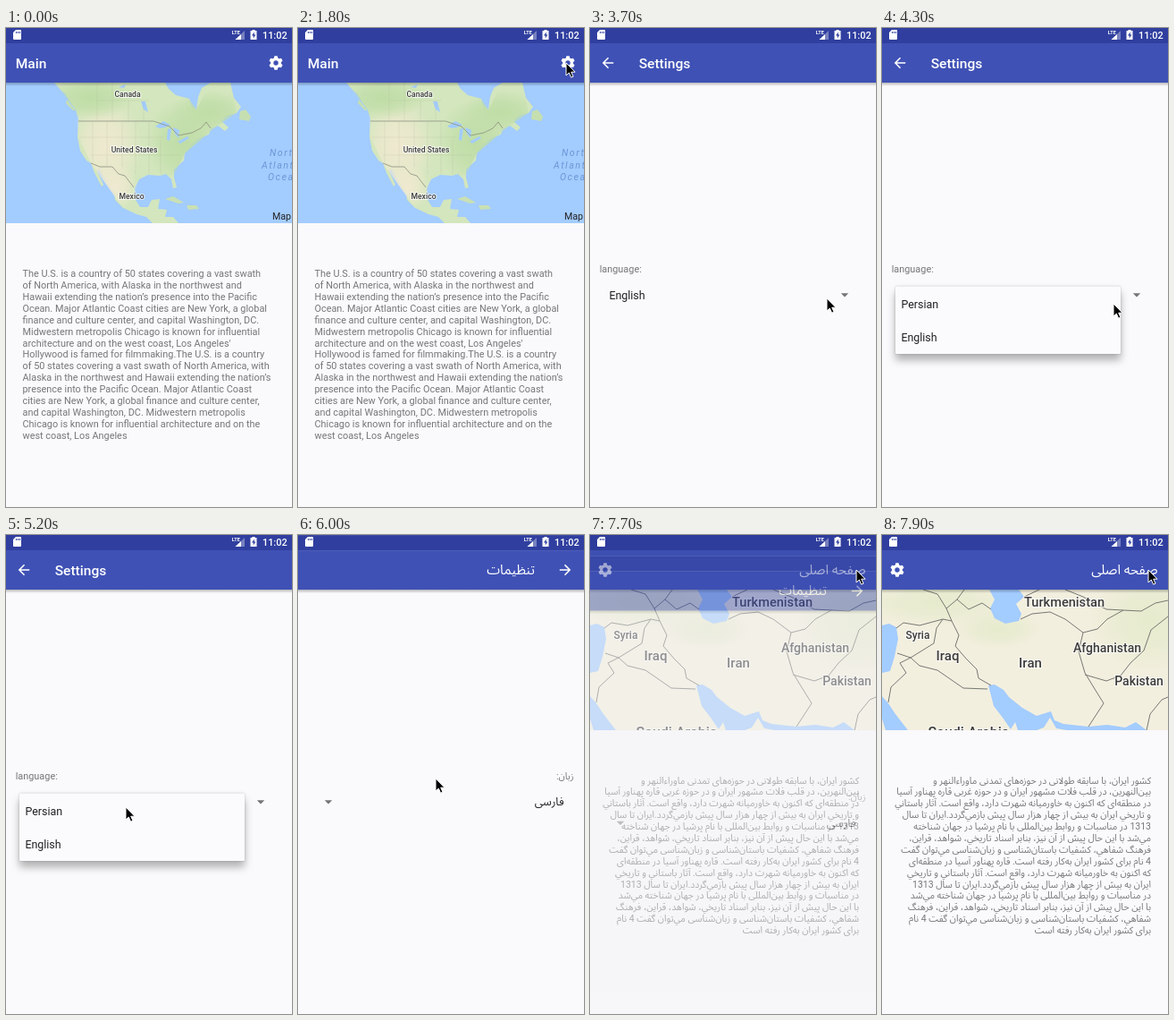
Animation, 320 px wide and 535 px high, one loop 8 s. Source, as an HTML page:

```html
<!DOCTYPE html>
<html lang="en">
<head>
<meta charset="utf-8">
<title>Language settings</title>
<style>
html, body { margin: 0; width: 100%; height: 100%; overflow: hidden; background: #000; }
svg { display: block; width: 320px; height: 535px; font-family: Roboto, "Noto Sans Arabic", "DejaVu Sans", sans-serif; }
text { white-space: pre; }
.title { font-size: 15.56px; font-weight: 500; fill: #fff; }
.fa .title { font-weight: 400; font-size: 15px; }
.small { font-size: 10.89px; fill: #767678; }
.fa .small { font-size: 10.5px; }
.item { font-size: 12.44px; fill: #212122; }
.clock { font-size: 10.89px; font-weight: 500; fill: #fff; }
.lte { font-size: 5.6px; font-weight: 700; fill: #fff; }
.place { font-weight: 500; fill: #3c3c3c; stroke: #fff; stroke-opacity: .7; stroke-width: 2px; paint-order: stroke; text-anchor: middle; }
.ocean { font-size: 10.5px; font-style: italic; letter-spacing: 1.6px; fill: #6a97d6; }
#popup { filter: drop-shadow(0 7px 5px rgba(0,0,0,.25)) drop-shadow(0 0 1px rgba(0,0,0,.22)); }
</style>
</head>
<body>
<svg id="stage" viewBox="0 0 320 535" xmlns="http://www.w3.org/2000/svg"></svg>
<script>
const stage = document.getElementById('stage');
const LOOP = 8000, STEP = 100;

const text = (cls, x, y, s, extra = '') => `<text class="${cls}" x="${x}" y="${y}" ${extra}>${s}</text>`;
const rtl = (cls, x, y, s) => text(cls, x, y, s, 'direction="rtl"');
const rect = (x, y, w, h, fill, extra = '') => `<rect x="${x}" y="${y}" width="${w}" height="${h}" fill="${fill}" ${extra}/>`;
const shape = (points, fill, extra = '') => `<path d="M${points}z" fill="${fill}" ${extra}/>`;
const place = (x, y, size, s) => text('place', x, y, s, `font-size="${size}"`);
const glow = (id, color) => `<radialGradient id="${id}"><stop offset="0" stop-color="${color}"/>` +
  `<stop offset=".5" stop-color="${color}" stop-opacity=".7"/><stop offset="1" stop-color="${color}" stop-opacity="0"/></radialGradient>`;
const blob = (x, y, rx, ry, id) => `<ellipse cx="${x}" cy="${y}" rx="${rx}" ry="${ry}" fill="url(#${id})"/>`;

function gear(cx, cy) {
  const pts = [];
  const add = (r, deg) => {
    const a = deg * Math.PI / 180;
    pts.push((cx + r * Math.cos(a)).toFixed(2) + ' ' + (cy + r * Math.sin(a)).toFixed(2));
  };
  for (let a = 30; a < 390; a += 60) {
    add(5.9, a - 22); add(7.9, a - 12); add(7.9, a + 12); add(5.9, a + 22);
  }
  return `<path fill="#fff" fill-rule="evenodd" d="M${pts.join('L')}z` +
    `M${cx - 2.7} ${cy}a2.7 2.7 0 1 0 5.4 0a2.7 2.7 0 1 0 -5.4 0z"/>`;
}

const arrow = (x, flip) => `<path transform="translate(${x} 39) scale(${flip * .78} .78)" fill="#fff" ` +
  `d="M8-1H-4.2L1.4-6.6L0-8L-8 0L0 8L1.4 6.6L-4.2 1H8z"/>`;
const caret = x => shape(`${x - 4.2} 296.2h8.4l-4.2 4.3`, '#747476');

const frame = (body, bar) => rect(0, 0, 320, 535, '#faf9fb') + body +
  rect(0, 61, 320, 4, 'url(#shade)') + rect(0, 0, 320, 17, '#303f9f') + rect(0, 17, 320, 44, '#3f51b5') + bar;

const paragraph = (lines, draw) => lines.trim().split('\n').map((s, i) => draw(s.trim(), i)).join('');

const america = () => {
  const land = '54 61L61 69L67 74L72 83L78 91L81 101L80 122L83 137L90 148L95 151L99 162L107 177L109 175L102 160L104 157' +
    'L112 171L121 184L122 192L131 201L146 208L157 211L164 218H193L187 211L178 211L180 203L170 202L172 191L163 192L159 200' +
    'L150 200L145 192L144 179L149 169L159 164L172 165L179 163L185 169L187 179L191 178L188 167L188 158L199 148L200 140' +
    'L206 131L216 123L227 119L229 113L237 109L245 115L249 111L241 104L247 98L258 95L263 88L255 78L251 61H229L219 67' +
    'L215 77L213 91L208 88L205 79L190 75L182 68L178 61';
  return `<g clip-path="url(#mapbox)">${rect(0, 61, 320, 157, '#a3ccff')}
    ${shape(land, '#d3e6bd')}
    <g clip-path="url(#usland)">
      ${blob(112, 132, 42, 58, 'sand')}${blob(122, 178, 26, 26, 'sand')}
      ${blob(198, 128, 42, 48, 'leaf')}${blob(95, 78, 48, 24, 'leaf')}${blob(228, 94, 44, 24, 'leaf')}
    </g>
    ${shape('262 93L268 91L274 99L272 104L261 102', '#c6dfb0')}
    ${shape('68 80L78 92L75 92L67 84', '#c6dfb0')}
    ${shape('178 191L187 188L199 195L193 196', '#c9e0b4')}
    ${shape('202 198L213 198L216 202L204 203', '#c9e0b4')}
    ${shape('167 110L176 104L184 108L178 111L172 112', '#a3ccff')}
    ${shape('181 113L185 112L183 126L180 125', '#a3ccff')}
    ${shape('187 111L194 114L193 123L189 118', '#a3ccff')}
    ${shape('192 127L203 121L205 123L195 129', '#a3ccff')}
    ${shape('151 82L156 82L159 94L154 91', '#a3ccff')}
    ${shape('126 66L134 63L132 67', '#a3ccff')}
    <path d="M81 104H165L183 110L193 120L208 117L218 112L224 105L229 112M95 151L105 155L119 155L126 163L133 165L143 178" fill="none" stroke="#8b9080" stroke-width=".8"/>
    <path d="M102 61V104M119 61V104M137 81V104M154 81V104M102 81H160M97 104V151M113 104V155M130 104V155M145 104V163M82 122H177M95 142H195M160 104V163M173 125V163" fill="none" stroke="#a8ab98" stroke-opacity=".32" stroke-width=".6"/>
    ${place(136, 77, 8.6, 'Canada')}${place(143.5, 139, 8.6, 'United States')}${place(140.5, 191, 8.6, 'Mexico')}
    ${text('ocean', 295, 143, 'North')}${text('ocean', 286, 156.5, 'Atlantic')}${text('ocean', 293, 170, 'Ocean')}
    ${text('', 298, 214, 'Map data', 'font-size="10.6" fill="#222"')}</g>`;
};

const iran = () => `<g clip-path="url(#mapbox)">${rect(0, 61, 320, 157, '#f3efdf')}
  ${blob(60, 75, 90, 28, 'pale')}${blob(300, 95, 70, 60, 'pale')}${blob(130, 105, 50, 22, 'pale')}
  ${shape('0 101L8 99L16 103L18 116L14 136L9 152L0 154', '#a3ccff')}
  ${shape('0 180L7 188L15 200L29 218H4L0 205', '#a3ccff')}
  ${shape('120 61L126 72L121 82L126 93L138 99L153 96L156 88L150 77L159 69L153 61', '#a3ccff')}
  ${shape('119 168L126 167L136 173L142 181L157 193L173 202L189 197L193 207L203 211L231 214L252 212L272 215L284 209L296 218H207L195 216L188 204L181 215L168 220L152 218L149 209L144 217L135 204L125 191', '#a3ccff')}
  <g fill="none" stroke="#777873" stroke-width="1" stroke-linejoin="round">
    <path d="M16 104L24 98L42 101L68 94L78 96L86 112L82 124L94 138L106 150L108 160L122 168"/>
    <path d="M68 94L61 104L58 121L32 137L17 132M32 137L42 146L62 151L91 171L118 172M32 137L20 143L27 154L10 170L7 187"/>
    <path d="M78 96L72 82L84 72L97 83L112 76L122 83M72 82L62 66L46 61M84 72L92 61"/>
    <path d="M155 94L168 88L188 86L205 94L225 109L220 130L227 154L238 172L248 188L231 214"/>
    <path d="M225 109L241 105L252 94L270 84L290 85L306 76L320 73M227 156L251 163L267 157L278 143L293 129L301 106L320 91"/>
    <path d="M159 69L176 61M205 61L225 69L251 83L270 84M296 218L300 200L313 184L320 181"/>
  </g>
  ${place(204, 80, 14.6, 'Turkmenistan')}${place(40, 116, 12, 'Syria')}${place(73.5, 139.5, 15, 'Iraq')}
  ${place(166, 148, 15, 'Iran')}${place(252, 131, 14, 'Afghanistan')}${place(287.5, 168, 14, 'Pakistan')}
  ${place(97, 226, 16, 'Saudi Arabia')}</g>`;

const english = paragraph(`The U.S. is a country of 50 states covering a vast swath
  of North America, with Alaska in the northwest and
  Hawaii extending the nation’s presence into the Pacific
  Ocean. Major Atlantic Coast cities are New York, a global
  finance and culture center, and capital Washington, DC.
  Midwestern metropolis Chicago is known for influential
  architecture and on the west coast, Los Angeles'
  Hollywood is famed for filmmaking.The U.S. is a country
  of 50 states covering a vast swath of North America, with
  Alaska in the northwest and Hawaii extending the nation’s
  presence into the Pacific Ocean. Major Atlantic Coast
  cities are New York, a global finance and culture center,
  and capital Washington, DC. Midwestern metropolis
  Chicago is known for influential architecture and on the
  west coast, Los Angeles`, (s, i) => text('small', 18.5, 278.2 + i * 12.89, s));

// an underscore stands for a zero-width non-joiner
const persian = paragraph(`کشور ایران، با سابقه طولانی در حوزه_های تمدنی ماوراءالنهر و
  بین_النهرین، در قلب فلات مشهور ایران و در حوزه غربی قاره پهناور آسیا
  در منطقه_ای که اکنون به خاورمیانه شهرت دارد، واقع است. آثار باستاني
  و تاریخي ایران به بیش از چهار هزار سال پیش بازمي_گردد.ایران تا سال
  1313 در مناسبات و روابط بین_المللی با نام پرشیا در جهان شناخته
  مي_شد با این حال پیش از آن نیز، بنابر اسناد تاریخي، شواهد، قراین،
  فرهنگ شفاهي، کشفیات باستان_شناسی و زبان_شناسی مي_توان گفت
  4 نام برای کشور ایران به_کار رفته است. قاره پهناور آسیا در منطقه_ای
  که اکنون به خاورمیانه شهرت دارد، واقع است. آثار باستاني و تاریخي
  ایران به بیش از چهار هزار سال پیش بازمي_گردد.ایران تا سال 1313
  در مناسبات و روابط بین_المللی با نام پرشیا در جهان شناخته مي_شد
  با این حال پیش از آن نیز، بنابر اسناد تاریخي، شواهد، قراین، فرهنگ
  شفاهي، کشفیات باستان_شناسی و زبان_شناسی مي_توان گفت 4 نام
  برای کشور ایران به_کار رفته است`, (s, i) => rtl('small', 301, 277.5 + i * 12.89, s.replace(/_/g, '&zwnj;')));

const screens = {
  mainEn: frame(america() + english, text('title', 10.7, 45.3, 'Main') + gear(302, 39)),
  mainFa: frame(iran() + persian, rtl('title', 308.5, 43.5, 'صفحه اصلی') + gear(17, 39)),
  setEn: frame(text('small', 10.7, 272.8, 'language:') + text('item', 21.4, 303, 'English') + caret(285),
    arrow(20, 1) + text('title', 54.7, 45.3, 'Settings')),
  setFa: frame(rtl('small', 308.5, 272.5, 'زبان:') + rtl('item', 297.5, 302, 'فارسی') + caret(34),
    arrow(299, -1) + rtl('title', 265, 43.5, 'تنظیمات'))
};

const status = `<path fill="#fff" fill-rule="evenodd" d="M11 2H16Q17 2 17 3V12Q17 13 16 13H9Q8 13 8 12V5zM11 4v2h1v-2zM13 4v2h1v-2zM15 4v2h1v-2z"/>
  ${text('lte', 252.8, 6.8, 'LTE')}
  ${shape('267 3V13H256.5', '#fff', 'fill-opacity=".35"')}${shape('263 7V13H256.5', '#fff')}
  <path fill="#fff" fill-rule="evenodd" d="M275.5 2h3v1h2v10h-7v-10h2zM277.7 4.5L275 8.5h1.7v3L279.4 7.5h-1.7z"/>
  ${text('clock', 287, 12, '11:02')}`;

stage.innerHTML = `<defs>
  <clipPath id="mapbox"><rect x="0" y="61" width="320" height="157"/></clipPath>
  <clipPath id="usland"><path d="M54 61L78 91L81 122L95 151L131 201L164 218L144 190L149 169L188 164L200 140L237 109L258 95L251 61H229L213 91L205 79L178 61z"/></clipPath>
  <linearGradient id="shade" x2="0" y2="1"><stop stop-opacity=".26"/><stop offset="1" stop-opacity="0"/></linearGradient>
  ${glow('sand', '#efe9d0')}${glow('leaf', '#bfdda6')}${glow('pale', '#e6ebcd')}</defs>` +
  Object.entries(screens).map(([id, s]) => `<g id="${id}" class="${id.slice(-2).toLowerCase()}">${s}</g>`).join('') +
  `<g id="popup">${rect(15, 288.5, 252, 75.5, '#fbfafc', 'rx="1.5"')}` +
  `${text('item', 21.4, 312.5, 'Persian')}${text('item', 21.4, 350, 'English')}</g>` + status +
  `<g id="cursor">${shape('0 0V14L3.3 11L5.6 16.2L8 15.2L5.7 10.2H10', '#000', 'stroke="#fff" stroke-width="1"')}</g>`;

const el = id => document.getElementById(id);
const names = Object.keys(screens);
const clamp = v => Math.max(0, Math.min(1, v));

function show(id, alpha = 1, y = 0) {
  const g = el(id);
  g.style.display = '';
  g.setAttribute('opacity', alpha);
  g.setAttribute('transform', `translate(0 ${y})`);
  stage.insertBefore(g, el('popup'));
}

function open(below, above, u) {
  if (u < 350) show(below, 1 - .3 * clamp(u / 217));
  show(above, 1 - (1 - clamp(u / 200)) ** 4, 43 * (1 - clamp(u / 350)) ** 5);
}

function close(below, above, u) {
  show(below, .7 + .3 * clamp(u / 200));
  if (u < 250) show(above, 1 - clamp((u - 100) / 150), 43 * clamp(u / 250) ** 2);
}

// time, x, y of the pointer tip
const path = [
  [400, 324, 240], [900, 311, 150], [1500, 300, 39], [2800, 300, 39], [3300, 272, 318], [3600, 265, 302],
  [4200, 265, 302], [4500, 240, 325], [4800, 180, 336], [5100, 134, 304], [5700, 134, 304],
  [6200, 165, 255], [6400, 178, 238], [7000, 295, 47], [7200, 295, 47], [7400, 298, 39], [8000, 298, 39]
];

function pointer(t) {
  const i = Math.max(1, path.findIndex(p => p[0] >= t));
  const [a, b] = [path[i - 1], path[i]];
  const k = clamp((t - a[0]) / (b[0] - a[0]));
  const e = k * k * (3 - 2 * k);
  return [a[1] + (b[1] - a[1]) * e, a[2] + (b[2] - a[2]) * e];
}

function render(t) {
  names.forEach(id => el(id).style.display = 'none');
  if (t < 2615) show('mainEn');
  else if (t < 5750) open('mainEn', 'setEn', t - 2615);
  else if (t < 7515) open('setEn', 'setFa', t - 5750);
  else close('mainFa', 'setFa', t - 7515);

  const pop = clamp((t - 3950) / 150) * (1 - clamp((t - 5450) / 150));
  el('popup').style.display = pop ? '' : 'none';
  el('popup').setAttribute('opacity', pop);

  el('cursor').style.display = t < 400 ? 'none' : '';
  el('cursor').setAttribute('transform', `translate(${pointer(t).map(Math.round).join(' ')})`);
}

const start = performance.now();
let last = -1;
function tick() {
  const t = Math.floor((performance.now() - start) % LOOP / STEP) * STEP;
  if (t !== last) render(last = t);
  requestAnimationFrame(tick);
}
render(0);
requestAnimationFrame(tick);
</script>
</body>
</html>
```
